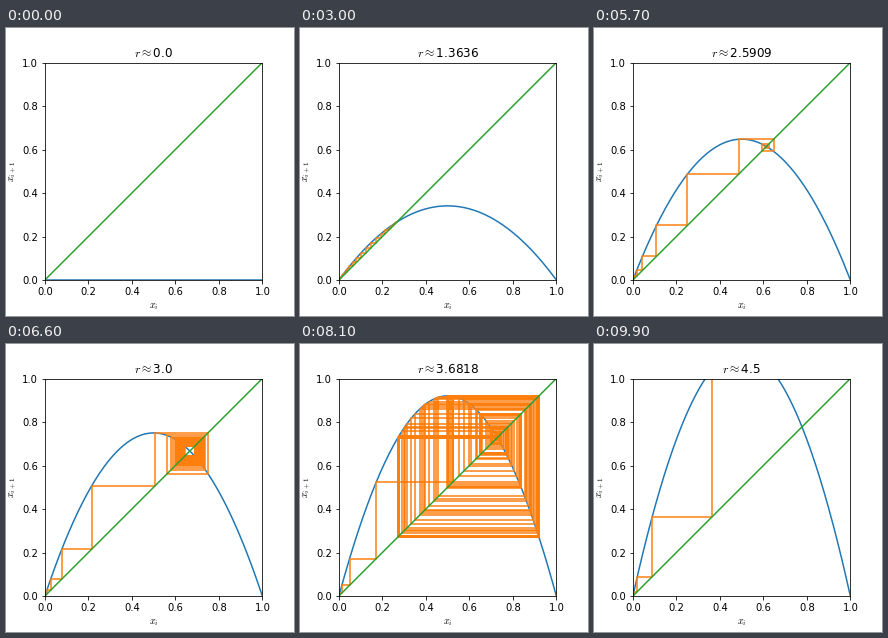
These frames come from a looping animation (288 px wide and 288 px high, 10000 ms). A matplotlib script:

```python
import matplotlib.pyplot as plt
import numpy as np
from matplotlib.animation import FuncAnimation

FRAMES = 100
STEPS = 100
X0 = 0.001
RATES = np.linspace(0, 4.5, FRAMES)

plt.rcParams.update({
    "font.family": "DejaVu Sans",
    "font.size": 10,
    "mathtext.fontset": "cm",
})


def logistic(r, x):
    return r * x * (1 - x)


def cobweb(r):
    """Staircase between the parabola and the diagonal."""
    x, points = X0, [(X0, X0)]
    for _ in range(STEPS):
        y = logistic(r, x)
        points += [(x, y), (y, y)]
        if abs(y) > 10:  # the orbit has escaped
            break
        x = y
    return np.transpose(points)


fig, ax = plt.subplots(figsize=(4, 4), dpi=72)
fig.subplots_adjust(left=0.125, right=0.9, bottom=0.125, top=0.88)
ax.set(xlim=(0, 1), ylim=(0, 1), aspect="equal",
       xlabel="$x_i$", ylabel="$x_{i+1}$")
title = ax.set_title("")

grid = np.linspace(0, 1, 201)
curve, = ax.plot([], [], color="C0")
web, = ax.plot([], [], color="C1")
ax.plot([0, 1], [0, 1], color="C2")


def update(frame):
    r = RATES[frame]
    curve.set_data(grid, logistic(r, grid))
    web.set_data(*cobweb(r))
    title.set_text(rf"$r \approx ${round(float(r), 4)}")
    return curve, web, title


anim = FuncAnimation(fig, update, frames=FRAMES, interval=100,
                     repeat=True, repeat_delay=0)
plt.show()
```
